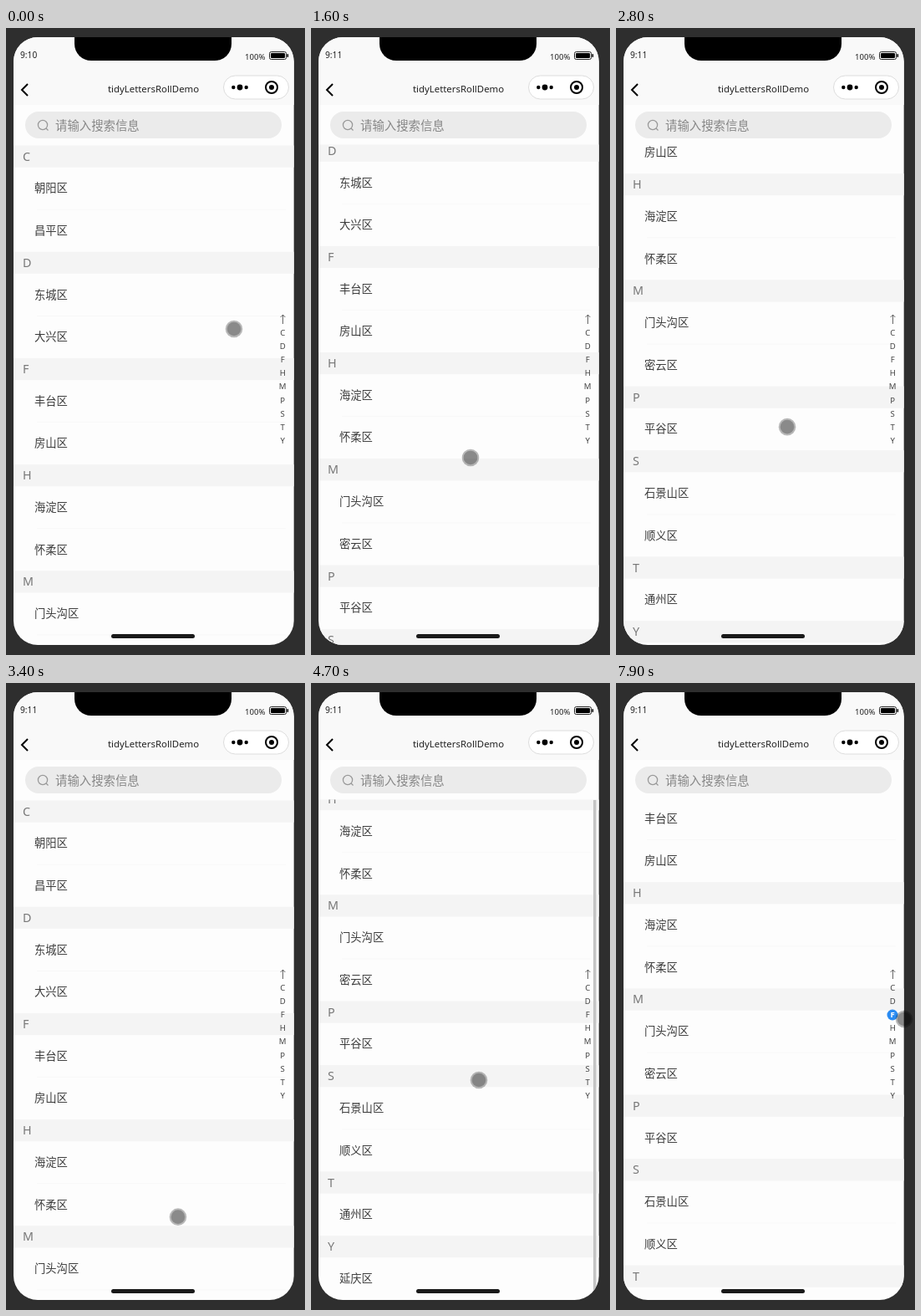
An HTML page that plays this animation: 358x750 px, repeating every 8000 ms.

```html
<!DOCTYPE html>
<html lang="zh">
<head>
<meta charset="utf-8">
<style>
html, body { margin: 0; width: 100%; height: 100%; overflow: hidden; background: #2e2e2e; }
svg { display: block; width: 358px; height: 750px; font-family: "Noto Sans", "Noto Sans CJK SC", "Noto Sans CJK", sans-serif; }
.head { font-size: 14.3px; fill: #777; }
.row { font-size: 13.3px; fill: #3c3c3c; }
.index { font-size: 9.6px; fill: #444; text-anchor: middle; }
</style>
</head>
<body>
<svg viewBox="0 0 358 750">
  <defs>
    <clipPath id="screen"><rect x="9" y="11" width="335.7" height="727" rx="29"/></clipPath>
    <clipPath id="view"><rect x="9" y="139.5" width="336" height="599"/></clipPath>
  </defs>
  <rect width="358" height="750" fill="#2e2e2e"/>
  <g clip-path="url(#screen)">
    <rect x="9" y="11" width="336" height="727" fill="#fdfdfd"/>
    <rect x="9" y="11" width="336" height="81" fill="#f9f9f9"/>
    <g clip-path="url(#view)"><g id="list"></g></g>
    <rect id="bar" x="338" y="140" width="3.5" height="587" fill="#c4c4c4"/>
  </g>
  <path d="M82 11H270V19A20 20 0 0 1 250 39H102A20 20 0 0 1 82 19Z"/>
  <text id="clock" x="17" y="36" font-size="10.2" fill="#222"></text>
  <text x="286" y="37.5" font-size="9.6" fill="#222">100%</text>
  <rect x="315.5" y="28.5" width="20" height="9" rx="2" fill="none" stroke="#222"/>
  <rect x="317" y="30" width="17" height="6" rx="1"/>
  <rect x="336.5" y="31" width="1.6" height="4" rx=".8"/>
  <path d="M26 67L19 74L26 81" fill="none" stroke="#000" stroke-width="2"/>
  <text x="176.5" y="77" font-size="11.4" text-anchor="middle" fill="#222">tidyLettersRollDemo</text>
  <rect x="260.5" y="57" width="78" height="28" rx="14" fill="#fff" stroke="#ddd"/>
  <circle cx="272.3" cy="71" r="2.2"/>
  <circle cx="280" cy="71" r="3.4"/>
  <circle cx="287.7" cy="71" r="2.2"/>
  <circle cx="318" cy="71" r="7" fill="none" stroke="#000" stroke-width="2"/>
  <circle cx="318" cy="71" r="3"/>
  <rect x="23" y="100" width="307" height="32" rx="16" fill="#ebebeb"/>
  <g fill="none" stroke="#999" stroke-width="1.3">
    <circle cx="44" cy="116" r="5.6"/>
    <path d="M48 120L50.5 122.5"/>
  </g>
  <text x="59" y="121.5" font-size="14.4" fill="#878787">请输入搜索信息</text>
  <path d="M331.5 354V343M328.7 346L331.5 343L334.3 346" fill="none" stroke="#555" stroke-width=".9"/>
  <circle id="badge" cx="331" cy="397" r="6.5" fill="#2b8cf2"/>
  <g id="letters"></g>
  <rect x="126" y="725" width="100" height="5" rx="2.5" fill="#1a1a1a"/>
  <g id="pointer">
    <circle r="10.3" opacity=".27"/>
    <circle r="8.3" opacity=".25"/>
  </g>
</svg>
<script>
const LOOP = 8000, STEP = 100;
const TOP = 140.5, HEAD_H = 26.2, ROW_H = 50.5, END = 396;
const groups = {
  C: "朝阳区 昌平区", D: "东城区 大兴区", F: "丰台区 房山区",
  H: "海淀区 怀柔区", M: "门头沟区 密云区", P: "平谷区",
  S: "石景山区 顺义区", T: "通州区", Y: "延庆区"
};

// Each gesture moves the finger vertically and takes the list to a new offset.
const gesture = (start, end, x, from, to, offset) => ({ start, end, x, from, to, offset });
const gestures = [
  gesture(0, 0, 273, 360, 360, 0),
  gesture(400, 900, 200, 298, 535, 0),
  gesture(1200, 2224, 191, 648, 252, END),
  gesture(2650, 3340, 205, 454, 645, 0),
  gesture(3500, 4340, 208, 625, 229, END),
  gesture(4400, 4700, 201, 475, 475, END),
  gesture(4700, 5400, 201, 475, 648, 0),
  gesture(5500, 6297, 219, 645, 249, END),
  gesture(6300, 7600, 345, 440, 402, END),
  gesture(7800, 7942, 345, 402, 402, 254)
];

const el = id => document.getElementById(id);
const mix = (a, b, p) => a + (b - a) * p;

function ease(from, to, t) {
  const p = Math.min(1, Math.max(0, (t - from) / (to - from || 1)));
  return p * p * (3 - 2 * p);
}

function add(parent, tag, attrs, text) {
  const node = document.createElementNS("http://www.w3.org/2000/svg", tag);
  for (const key in attrs) node.setAttribute(key, attrs[key]);
  if (text) node.textContent = text;
  parent.appendChild(node);
  return node;
}

const list = el("list"), indexText = {};
let y = TOP;
Object.keys(groups).forEach((letter, i) => {
  add(list, "rect", { x: 9, y, width: 336, height: HEAD_H, fill: "#f4f4f4" });
  add(list, "text", { x: 20, y: y + HEAD_H / 2 + 5, class: "head" }, letter);
  y += HEAD_H;
  groups[letter].split(" ").forEach((name, n) => {
    if (n) add(list, "rect", { x: 37, y: y - 0.5, width: 298, height: 1, fill: "#f8f8f8" });
    add(list, "text", { x: 34, y: y + ROW_H / 2 + 4.5, class: "row" }, name);
    y += ROW_H;
  });
  indexText[letter] = add(el("letters"), "text",
    { x: 331.2, y: 368 + i * 16.1, class: "index" }, letter);
});

function pose(t) {
  const i = gestures.findLastIndex(g => g.start <= t);
  const now = gestures[i], next = gestures[i + 1] || now;
  const before = i ? gestures[i - 1].offset : 0;
  const drag = ease(now.start, now.end, t);
  const glide = next === now ? 0 : ease(now.end, next.start, t);
  return {
    x: mix(now.x, next.x, glide),
    y: mix(mix(now.from, now.to, drag), next.from, glide),
    offset: mix(before, now.offset, drag)
  };
}

function draw(t) {
  const { x, y, offset } = pose(t);
  const picked = t >= 7900;
  list.setAttribute("transform", `translate(0 ${-offset})`);
  el("pointer").setAttribute("transform", `translate(${x} ${y})`);
  el("clock").textContent = t < 500 ? "9:10" : "9:11";
  el("bar").setAttribute("opacity", t >= 4600 && t < 4900 ? 1 : 0);
  el("badge").setAttribute("opacity", picked ? 1 : 0);
  indexText.F.style.fill = picked ? "#fff" : "";
  indexText.F.style.fontWeight = picked ? "bold" : "";
}

const start = performance.now();
function tick() {
  const t = Math.max(0, performance.now() - start) % LOOP;
  draw(Math.floor(t / STEP) * STEP);
  requestAnimationFrame(tick);
}
draw(0);
requestAnimationFrame(tick);
</script>
</body>
</html>
```
